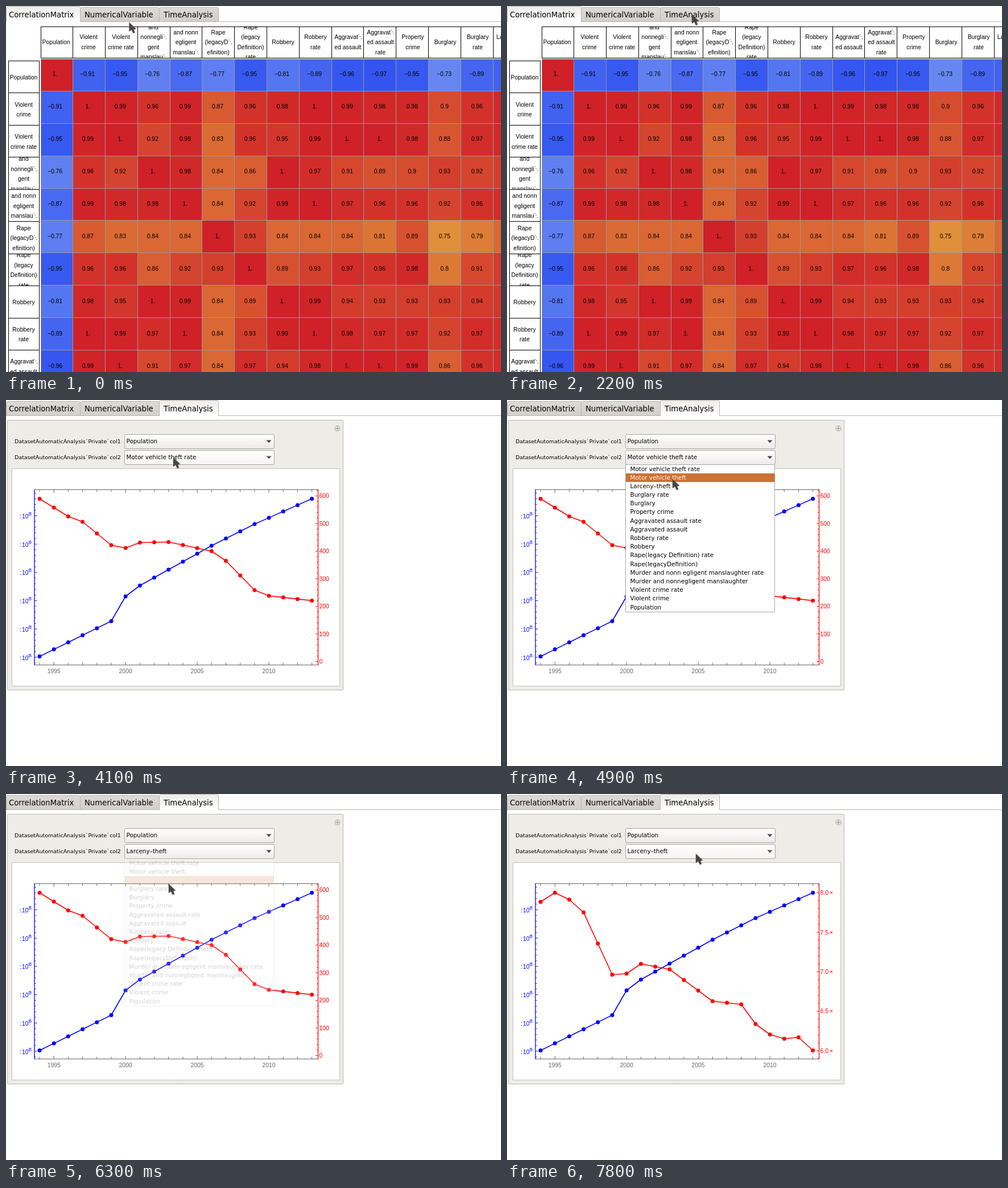
An HTML page with a canvas that plays this animation: 870x643 px, repeating every 8 s.

```html
<!DOCTYPE html>
<html lang="en">
<head>
<meta charset="utf-8">
<title>Dataset analysis</title>
<style>
html, body { margin: 0; width: 100%; height: 100%; overflow: hidden; background: #fff; }
canvas { display: block; }
</style>
</head>
<body>
<canvas id="stage" width="870" height="643"></canvas>
<script>
const ctx = document.getElementById('stage').getContext('2d');
const LOOP = 8000, STEP = 100, YEARS = 20;
const UI = '"DejaVu Sans", sans-serif', PLOT = '"Liberation Sans", Arial, sans-serif';
const SMALL = '10.4px ' + UI, CELL = '10.4px ' + PLOT;

// Cursor tip: [time, x, y]
const PATH = [
  [0, 216.5, 28.8], [300, 112, 88], [900, 558, 129], [1300, 632, 106], [1800, 461, 28], [2200, 325, 14.8],
  [2800, 325, 14.8], [3900, 294, 101], [4200, 294, 101], [4900, 291, 139], [5300, 291, 139],
  [5900, 286, 158], [7000, 286, 158], [7800, 332, 105]
];

// Each variable: label, likeness to population decline, likeness to rape.
// Line breaks are "|"; "~" is the diagonal continuation mark.
const VARIABLES = [
  ['Population', 1, 0.77], ['Violent|crime', 0.91, 0.87], ['Violent|crime rate', 0.95, 0.83],
  ['and|nonnegli~|gent|manslau~', 0.76, 0.84], ['and nonn|egligent|manslau~', 0.87, 0.84],
  ['Rape|(legacyD~|efinition)', 0.77, 1], ['Rape|(legacy|Definition)|rate', 0.95, 0.93],
  ['Robbery', 0.81, 0.84], ['Robbery|rate', 0.89, 0.84],
  ['Aggravat~|ed assault', 0.96, 0.84], ['Aggravat~|ed assault|rate', 0.97, 0.81],
  ['Property|crime', 0.95, 0.89], ['Burglary', 0.73, 0.75], ['Burglary|rate', 0.89, 0.79],
  ['Larceny–~|theft', 0.91, 0.84]
].map(([label, decline, rape], i) => ({ label, loading: loadings(decline, rape, i) }));

const MENU = ['Motor vehicle theft rate', 'Motor vehicle theft', 'Larceny–theft', 'Burglary rate', 'Burglary',
  'Property crime', 'Aggravated assault rate', 'Aggravated assault', 'Robbery rate', 'Robbery',
  'Rape(legacy Definition) rate', 'Rape(legacyDefinition)', 'Murder and nonn egligent manslaughter rate',
  'Murder and nonnegligent manslaughter', 'Violent crime rate', 'Violent crime', 'Population'];

// Bends of each curve: [years after 1994, height]
const POPULATION = [[0, 450.5], [5, 388.5], [6, 345], [7, 326], [12, 256], [15, 218], [19, 173.5]];
const VEHICLE_RATE = [[0, 173.5], [2, 204.5], [3, 214], [5, 255], [6, 260], [7, 250.5], [9, 249.5],
  [12, 265.5], [13, 282.5], [15, 334], [16, 344], [19, 352.5]];
const LARCENY = [[0, 189.5], [1, 173.5], [2, 185.5], [3, 208], [5, 317.5], [6, 315.5], [7, 298.5], [9, 308],
  [12, 364], [14, 369.5], [15, 404], [16, 422.5], [17, 430], [18, 427.5], [19, 450.5]];

const lerp = (a, b, k) => a + (b - a) * k;
const clamp = v => Math.max(0, Math.min(1, v));

// Piecewise linear values of [position, ...values] knots
function sample(knots, at) {
  const next = Math.max(1, knots.findIndex(k => k[0] >= at));
  const [p1, ...from] = knots[next - 1], [p2, ...to] = knots[next];
  return from.map((v, i) => lerp(v, to[i], (at - p1) / (p2 - p1)));
}

// Three orthogonal factors; property crimes share less of the last one.
function loadings(decline, rape, index) {
  const overlap = 0.77, second = (rape - overlap * decline) / Math.sqrt(1 - overlap ** 2);
  const third = Math.sqrt(Math.max(0, 1 - decline ** 2 - second ** 2));
  return [decline, second, third * (index > 10 ? 0.82 : 1)];
}

function correlation(a, b) {
  if (a === b) return 1;
  const dot = VARIABLES[a].loading.reduce((sum, v, i) => sum + v * VARIABLES[b].loading[i], 0);
  return Math.round(dot * 100) / 100 * (a && b ? 1 : -1);
}

function text(str, x, y, font, color = '#000', align = 'left') {
  ctx.font = font;
  ctx.fillStyle = color;
  ctx.textAlign = align;
  ctx.fillText(str, x, y);
}

function line(x1, y1, x2, y2, color, width = 1) {
  ctx.strokeStyle = color;
  ctx.lineWidth = width;
  ctx.beginPath();
  ctx.moveTo(x1, y1);
  ctx.lineTo(x2, y2);
  ctx.stroke();
}

function box(x, y, w, h, fill, stroke, radius = 0) {
  ctx.beginPath();
  ctx.roundRect(x, y, w, h, radius);
  ctx.fillStyle = fill;
  ctx.fill();
  ctx.strokeStyle = stroke;
  ctx.lineWidth = 1;
  ctx.stroke();
}

function gradient(y1, y2, top, bottom) {
  const g = ctx.createLinearGradient(0, y1, 0, y2);
  g.addColorStop(0, top);
  g.addColorStop(1, bottom);
  return g;
}

function drawCursor([x, y]) {
  const shape = new Path2D('M0 0V16L4 13L7 19L10 18L8 12.5L12 11.5Z');
  ctx.save();
  ctx.translate(x, y);
  ctx.fillStyle = '#454545';
  ctx.strokeStyle = 'rgba(90,90,90,.5)';
  ctx.lineWidth = 1;
  ctx.fill(shape);
  ctx.stroke(shape);
  ctx.restore();
}

function drawTabs(active) {
  line(0, 27.5, 870, 27.5, '#b8b5b0');
  [['CorrelationMatrix', 0, 130], ['NumericalVariable', 130, 269], ['TimeAnalysis', 269, 373]].forEach(([name, x1, x2], i) => {
    const on = i === active, top = on ? 0.5 : 2.5;
    const fill = on ? gradient(0, 28, '#eeebe7', '#ffffff') : gradient(2, 27, '#dddad6', '#d3d0cb');
    box(x1 + 0.5, top, x2 - x1, 27.5 - top, fill, '#b8b5b0', [3, 3, 0, 0]);
    if (on) { ctx.fillStyle = '#fff'; ctx.fillRect(x1 + 1, 26.5, x2 - x1 - 1, 2); }
    text(name, i ? x1 + 8 : 5, 20, '13.2px ' + UI);
  });
}

function heatColor(v) {
  const mix = (a, b, k) => `rgb(${a.map((c, i) => Math.round(lerp(c, b[i], k)))})`;
  if (v < 0) return mix([46, 78, 240], [108, 141, 241], (v + 1) / 0.3);
  return mix([208, 32, 40], [224, 143, 58], (1 - v) / 0.25);
}

function drawLabel(label, cx, cy, x, y, w, h) {
  ctx.save();
  ctx.beginPath();
  ctx.rect(x, y, w, h);
  ctx.clip();
  const rows = label.split('|');
  rows.forEach((row, i) => {
    const word = row.replace('~', ''), wraps = word !== row;
    const base = Math.round(cy + (i - (rows.length - 1) / 2) * 17.5 + 4);
    ctx.font = CELL;
    const width = ctx.measureText(word).width, left = cx - (width + (wraps ? 6 : 0)) / 2;
    text(word, left, base, CELL);
    if (wraps) [[1, 8], [3, 5], [5, 1]].forEach(([dx, dy]) => ctx.fillRect(left + width + dx, base - dy, 1, 1));
  });
  ctx.restore();
}

function drawMatrix() {
  const pitch = 56.79, rowPitch = 56.5;
  const edge = (start, i, size = pitch) => Math.floor(start + i * size);
  VARIABLES.forEach(({ label }, c) => {
    const x = edge(61, c), width = edge(61, c + 1) - x;
    for (let r = 0; r < 10; r++) {
      const v = correlation(r, c), y = edge(93, r);
      ctx.fillStyle = heatColor(v);
      ctx.fillRect(x, y, width, pitch + 1);
      const value = v === 1 ? '1.' : String(v).replace('-', '−');
      text(value, 86 + c * 57 + (v > 0 && c ? 0.8 : 0), 123 + r * 57, CELL, '#000', 'center');
    }
    line(x + 0.5, 36, x + 0.5, 92, '#000');
    drawLabel(label, 88 + c * 57, 63, x + 1, 37, width - 1, 54);
  });
  VARIABLES.forEach(({ label }, i) => {
    const x = edge(61, i) + 0.5, y = edge(93, i) + 0.5, rowY = edge(96, i, rowPitch) + 0.5;
    line(x, 93, x, 643, '#999');
    line(61, y, 870, y, '#999');
    line(4, rowY, 59, rowY, '#000');
    drawLabel(label, 31, 125 + i * 56.45, 5, rowY + 0.5, 53, rowPitch - 1);
  });
  for (const y of [36.5, 91.5]) line(61, y, 870, y, '#000');
  for (const x of [4.5, 58.5]) line(x, 96, x, 643, '#000');
}

function drawPopup(name, value, y, hover) {
  text(name, 15, y + 15.5, '9.47px ' + UI);
  box(208.5, y, 263, 25, gradient(y, y + 25, '#ffffff', hover ? '#f5f4f2' : '#ecebe8'), '#a9a59f', 2.5);
  text(value, 211.5, y + 15.5, SMALL);
  ctx.fillStyle = hover ? '#555' : '#4a4a4a';
  ctx.fill(new Path2D(`M457.5 ${y + 10}h9l-4.5 5Z`));
}

const yearX = i => 59 + i * 25.19;

function drawCurve(knots, color) {
  const points = Array.from({ length: YEARS }, (_, i) => [yearX(i), sample(knots, i)[0]]);
  ctx.strokeStyle = ctx.fillStyle = color;
  ctx.lineWidth = 1.6;
  ctx.lineJoin = 'round';
  ctx.beginPath();
  points.forEach(p => ctx.lineTo(...p));
  ctx.stroke();
  points.forEach(p => {
    ctx.beginPath();
    ctx.arc(...p, 3.5, 0, 7);
    ctx.fill();
  });
}

// Ticks from a labelled position, four minor ones between majors
function drawTicks(x, side, first, pitch, color) {
  for (let k = -50; k < 50; k++) {
    const y = first + k * pitch / 5;
    if (y > 158 && y < 466) line(x, y, x + side * (k % 5 ? 2.5 : 4.5), y, color, 0.9);
  }
}

function drawPlot(larceny) {
  const gray = '#666', blue = '#00f', red = '#f00';
  box(10.5, 120.5, 576, 382, '#fff', '#c4c1bc');
  for (const y of [157.5, 465.5]) line(50, y, 548, y, gray);
  for (let i = 0; i < YEARS; i++) {
    const x = yearX(i), major = i % 5 === 1, size = major ? 5 : 3.5;
    line(x, 158, x, 158 + size, gray);
    line(x, 465, x, 465 - size, gray);
    if (major) text(1994 + i, x, 479.5, CELL, gray, 'center');
  }
  line(50, 157, 50, 466, blue, 1.3);
  drawTicks(50, 1, 203.5, 49.7, blue);
  for (let i = 0; i < 6; i++) {
    const y = 203.5 + i * 49.7;
    text(':', 24, y + 4.5, CELL, blue);
    text('10', 28, y + 4.5, CELL, blue);
    text('8', 39.5, y - 0.5, '9.8px ' + PLOT, blue);
  }
  line(548.5, 157, 548.5, 466, red, 1.3);
  const first = larceny ? 173.5 : 168.5, pitch = larceny ? 69.4 : 48.5;
  drawTicks(548.5, -1, first, pitch, red);
  for (let i = 0; i < (larceny ? 5 : 7); i++) {
    const label = larceny ? (8 - i / 2).toFixed(1) + '\u2009×' : 600 - i * 100;
    text(label, 550.5, first + i * pitch + 3.7, CELL, red);
  }
  drawCurve(POPULATION, blue);
  drawCurve(larceny ? LARCENY : VEHICLE_RATE, red);
}

function drawMenu(alpha, selected) {
  const pitch = 15.19;
  ctx.save();
  ctx.globalAlpha = alpha;
  box(208.5, 113.5, 262, 259, '#fff', '#aaa7a2');
  ctx.fillStyle = '#cd7135';
  ctx.fillRect(209, 113.7 + selected * pitch, 261.5, pitch);
  MENU.forEach((item, i) =>
    text(item, 216.5, 124.5 + i * pitch, SMALL, i === selected ? '#fff4ea' : '#000'));
  ctx.restore();
}

function drawTimeAnalysis(t, [x, y]) {
  const over = top => x > 208 && x < 471 && y >= top && y < top + 25;
  const menuAlpha = t < 5000 ? clamp((t - 4200) / 250) : clamp((6360 - t) / 340);
  const prefix = 'DatasetAutomaticAnalysis`Private`';
  box(2.5, 35.5, 590, 474, '#eeece7', '#bab7b1', 1);
  ctx.strokeStyle = '#aaa';
  ctx.lineWidth = 1.2;
  ctx.beginPath();
  ctx.arc(582.5, 50, 4.3, 0, 7);
  ctx.stroke();
  line(580, 50, 585, 50, '#999', 1.4);
  line(582.5, 47.5, 582.5, 52.5, '#999', 1.4);
  drawPopup(prefix + 'col1', 'Population', 60.5, over(60));
  drawPopup(prefix + 'col2', t < 6100 ? MENU[0] : MENU[2], 88.5, over(88));
  drawPlot(t >= 6800);
  const selected = t < 4600 ? 0 : t < 5600 ? 1 : 2;
  if (menuAlpha > 0) drawMenu(menuAlpha, selected);
}

function draw(now) {
  const t = Math.floor(now % LOOP / STEP) * STEP;
  const cursor = sample(PATH, Math.min(t, 7800)), timeTab = t >= 2700;
  ctx.fillStyle = '#fff';
  ctx.fillRect(0, 0, 870, 643);
  drawTabs(timeTab ? 2 : 0);
  if (timeTab) drawTimeAnalysis(t, cursor);
  else drawMatrix();
  drawCursor(cursor);
  requestAnimationFrame(draw);
}
requestAnimationFrame(draw);
</script>
</body>
</html>
```
